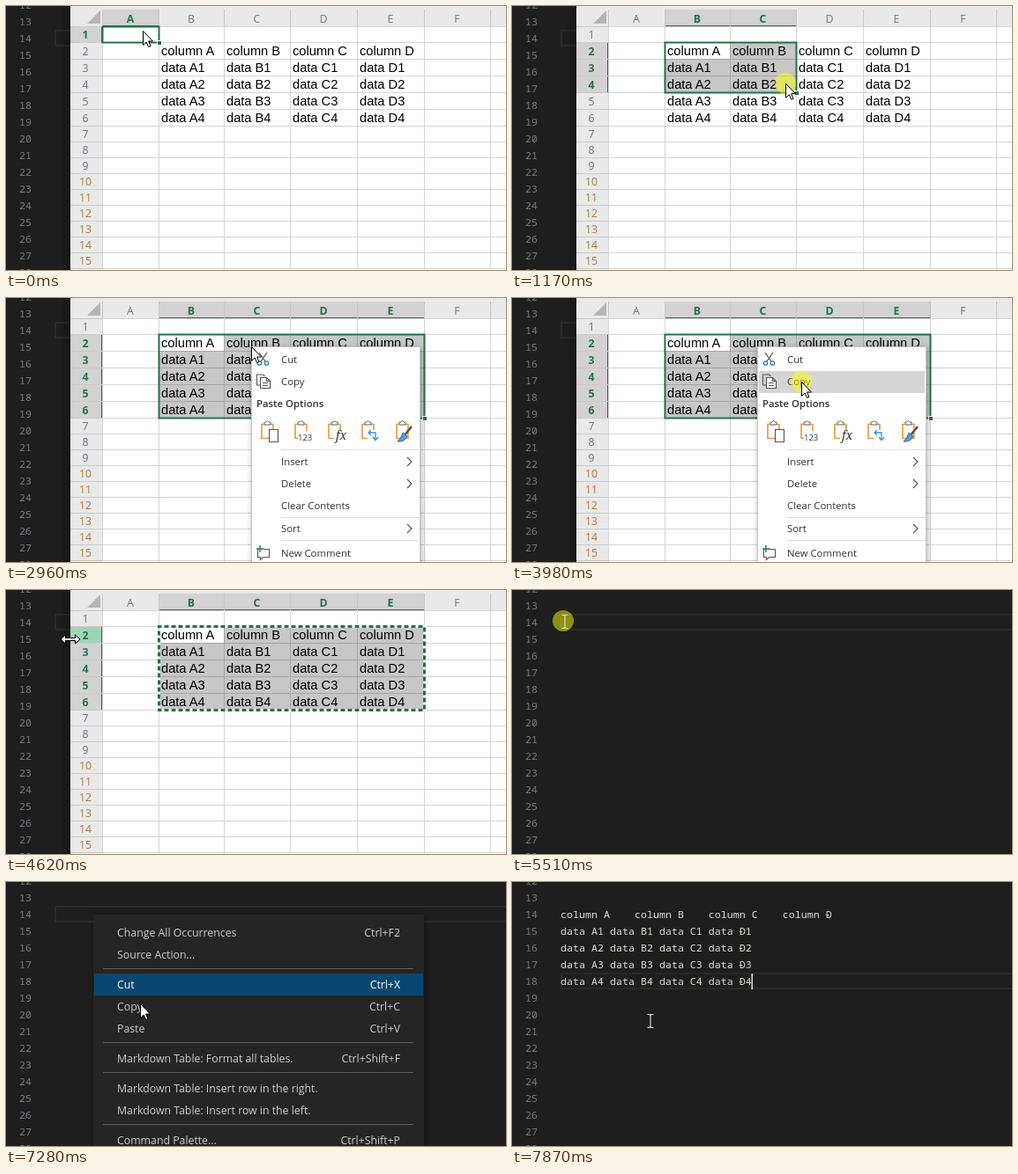
Write an HTML page that moves like this. It is 567 px wide and 300 px high and loops after 8000 ms.

```html
<!DOCTYPE html>
<html lang="en">
<head>
<meta charset="utf-8">
<title>Copy cells into the editor</title>
<style>
html, body { margin: 0; width: 100%; height: 100%; overflow: hidden; background: #1e1e1e; }
svg { display: block; width: 567px; height: 300px; }
text { white-space: pre; }
.mono { font: 11.667px "Noto Sans Mono", monospace; }
.cell { font: 14.67px "Liberation Sans", Arial, sans-serif; fill: #000; }
.head { font: 12.3px "Open Sans", sans-serif; text-anchor: middle; }
.sheetMenu { font: 11.35px "Open Sans", sans-serif; fill: #333; }
.editMenu { font: 12.3px "Open Sans", sans-serif; fill: #ccc; }
.menu { filter: drop-shadow(1px 2px 3px rgba(0, 0, 0, .35)); }
</style>
</head>
<body>
<script>
const LOOP = 8000;
const GREEN = '#217346';
const COLS = [109, 173, 247, 322, 398, 474, 549, 625];
const ROWS = [23, 41, 60, 79, 98, 117, 136];
while (ROWS.length < 17) ROWS.push(ROWS[ROWS.length - 1] + 18);

// Pointer track: time, x, y
const TRACK = [
  [0, 155, 28], [120, 155, 28], [380, 190, 57], [780, 190, 57], [1480, 405, 112],
  [1710, 441, 134], [1860, 441, 134], [1990, 439, 117], [2030, 437, 115], [2370, 278, 55],
  [3300, 278, 55], [3470, 312, 81], [3590, 312, 81], [3750, 328, 95], [4130, 328, 95],
  [4620, 73, 56], [4670, 73, 56], [4860, 58, 35], [5800, 58, 35], [6020, 100, 36],
  [6960, 100, 36], [7280, 152, 138], [7320, 152, 138], [7430, 155, 157], [8000, 155, 157]
];
const PRESSES = [[690, 1860], [2680, 2830], [3980, 4130], [5430, 5570], [6330, 6480], [7600, 7740]];
const T = { select: 690, sheetMenu: 2840, copied: 4130, toEditor: 5460, editMenu: 6500, menuGone: 7840, pasted: 7870 };

function el(tag, attrs, parent) {
  const node = document.createElementNS('http://www.w3.org/2000/svg', tag);
  set(node, attrs);
  if (parent) parent.appendChild(node);
  return node;
}
function set(node, attrs) {
  for (const key in attrs) node.setAttribute(key, attrs[key]);
}
function show(node, on) {
  node.style.display = on ? '' : 'none';
}
function group(parent, attrs = {}) {
  return el('g', attrs, parent);
}
function rect(parent, x, y, width, height, fill, more = {}) {
  return el('rect', { x, y, width, height, fill, ...more }, parent);
}
function path(parent, d, stroke, width = 1, fill = 'none') {
  return el('path', { d, stroke, 'stroke-width': width, fill }, parent);
}
function text(parent, x, y, str, cls, more = {}) {
  const node = el('text', { x, y, class: cls, ...more }, parent);
  node.textContent = str;
  return node;
}

const svg = el('svg', { viewBox: '0 0 567 300', width: 567, height: 300 }, document.body);

// Editor
const lineY = n => 37 + 19 * (n - 14);
rect(svg, 0, 0, 567, 300, '#1e1e1e');
const activeLine = rect(svg, 56, 28, 530, 17, 'none', { stroke: '#2a2a2a', 'stroke-width': 2 });
for (let n = 12; n <= 28; n++) text(svg, 15, lineY(n) + 4, n, 'mono', { fill: '#757b80' });
const pasted = group(svg, { fill: '#dcdcd6' });
const letters = ['A', 'B', 'C', 'Đ'];
text(pasted, 55, 41, letters.map(c => 'column ' + c).join('    '), 'mono');
for (let r = 1; r <= 4; r++) {
  text(pasted, 55, lineY(14 + r) + 4, letters.map(c => 'data ' + c + r).join(' '), 'mono');
}
rect(pasted, 271.5, 104, 1.5, 18, '#ddd');

// Spreadsheet
const sheet = group(svg);
const shade = el('linearGradient', { id: 'shade' }, el('defs', {}, svg));
el('stop', { offset: 0, 'stop-color': '#000', 'stop-opacity': 0 }, shade);
el('stop', { offset: 1, 'stop-color': '#000', 'stop-opacity': .25 }, shade);
rect(sheet, 60, 0, 13, 300, 'url(#shade)');
rect(sheet, 73, 0, 494, 300, '#fff');
rect(sheet, 73, 0, 494, 23, '#e9e9e9');
rect(sheet, 73, 23, 36, 277, '#e9e9e9');
path(sheet, 'M107 5V20H92Z', 'none', 0, '#b5b5b5');

function header(x, y, w, h, label, color, vertical) {
  const bg = rect(sheet, x, y, w, h, '#d2d2d2');
  const edge = vertical ? rect(sheet, x + w - 1, y, 2, h + 1, GREEN) : rect(sheet, x, y + h - 1, w + 1, 2, GREEN);
  const node = text(sheet, x + w / 2 - (vertical ? 1 : 0), y + h / 2 + 5, label, 'head');
  return (on, hover) => {
    show(bg, on || hover);
    show(edge, on);
    set(bg, { fill: hover ? '#9fd5b7' : '#d2d2d2' });
    set(node, { fill: on ? GREEN : color, 'font-weight': on ? 700 : 400 });
    node.style.fontWeight = on ? 700 : 400;
  };
}
const colHeads = [...'ABCDEF'].map((c, i) =>
  header(COLS[i], 4, COLS[i + 1] - COLS[i], 19, c, '#6f7d76', false));
const rowHeads = ROWS.slice(0, 15).map((y, i) =>
  header(73, y, 36, ROWS[i + 1] - y, i + 1, i < 9 ? '#6b7280' : '#ad7c3e', true));

for (const x of COLS) {
  rect(sheet, x, 4, 1, 19, '#c6c6c6');
  rect(sheet, x, 23, 1, 277, '#d4d4d4');
}
for (const y of ROWS) {
  rect(sheet, 73, y, 36, 1, '#cacaca');
  rect(sheet, 109, y, 458, 1, '#d4d4d4');
}
const tint = path(sheet, '', 'none', 0, '#000');
set(tint, { 'fill-opacity': .22, 'fill-rule': 'evenodd' });
for (let c = 1; c <= 4; c++) {
  for (let r = 1; r <= 5; r++) {
    const letter = 'ABCD'[c - 1];
    text(sheet, COLS[c] + 3, (ROWS[r] + ROWS[r + 1]) / 2 + 5.5,
      r === 1 ? 'column ' + letter : 'data ' + letter + (r - 1), 'cell');
  }
}
const border = rect(sheet, 0, 0, 0, 0, 'none', { stroke: GREEN, 'stroke-width': 2 });
const handle = rect(sheet, 0, 0, 5, 5, GREEN, { stroke: '#fff', 'stroke-width': 1 });
const ants = group(sheet);
const antBox = { x: 173.5, y: 41.5, width: 301, height: 95, fill: 'none' };
el('rect', { ...antBox, stroke: '#fff', 'stroke-width': 3 }, ants);
const antDash = el('rect', { ...antBox, stroke: GREEN, 'stroke-width': 3, 'stroke-dasharray': '5 3' }, ants);

// Spreadsheet context menu
const sheetMenu = group(svg, { class: 'menu' });
rect(sheetMenu, 278.5, 55.5, 191, 260, '#fff', { stroke: '#c6c6c6' });
const sheetHover = rect(sheetMenu, 280, 57, 188, 25, '#d5d5d5');
[['Cut', 70], ['Copy', 95], ['Insert', 186, 1], ['Delete', 211, 1], ['Clear Contents', 236],
 ['Sort', 262, 1], ['New Comment', 290]].forEach(([label, y, more]) => {
  text(sheetMenu, 312, y + 4, label, 'sheetMenu');
  if (more) path(sheetMenu, `M455 ${y - 5}l5 5l-5 5`, '#555', 1.2);
});
text(sheetMenu, 284, 124, 'Paste Options', 'sheetMenu').style.fontWeight = 600;
for (const y of [172, 249, 275]) rect(sheetMenu, 312, y, 156, 1, '#dcdcdc');

path(sheetMenu, 'M287 62l7 10M296 62l-7 10', '#555', 1.3);
for (const x of [287.5, 295.5]) el('circle', { cx: x, cy: 74, r: 2.2, fill: 'none', stroke: '#2b7bc0', 'stroke-width': 1.3 }, sheetMenu);
path(sheetMenu, 'M288 99h-3.500v-12h7l2 2', '#555', 1.1);
path(sheetMenu, 'M288.500 90.500h7l4 4v8h-11zM295.500 90.500v4h4M291 96.500h6M291 99.500h6', '#555', 1.1, '#fff');
path(sheetMenu, 'M285.500 285.500h13v9h-7l-3 3v-3h-3z', '#555', 1.1, '#fff');
path(sheetMenu, 'M288 281v8M284 285h8', '#2e8b57', 1.6);

for (const x of [289, 327, 365, 403, 442]) {
  path(sheetMenu, `M${x + 1} 143.500h13v16h-13z`, '#e39a3b', 1.6, '#fff');
  path(sheetMenu, `M${x + 4} 144v-3h2q1.500 -3 3 0h2v3z`, '#666', 1, '#fff');
}
path(sheetMenu, 'M298.500 149.500h10v14h-10z', '#555', 1.1, '#fff');
rect(sheetMenu, 331, 151, 18, 12, '#fff');
text(sheetMenu, 331, 162, '123', 'sheetMenu').style.fontSize = '9.5px';
rect(sheetMenu, 372, 150, 14, 13, '#fff');
const fx = text(sheetMenu, 374, 161, 'fx', 'sheetMenu');
fx.style.font = 'italic 14px "Noto Serif", serif';
rect(sheetMenu, 410, 150, 13, 14, '#fff');
path(sheetMenu, 'M412 153h7v8M416 158l3 3.500l3 -3.500M414 150l-3 3l3 3', '#3a8fd0', 1.3);
path(sheetMenu, 'M460 146l-8 10', '#555', 2.6);
path(sheetMenu, 'M450 153l5 4q-3 7 -11 6q4 -3 6 -10z', '#2b6ca8', 1, '#5b9bd5');

// Editor context menu
const editMenu = group(svg, { class: 'menu' });
rect(editMenu, 99, 37, 375, 290, '#252526');
const editHover = rect(editMenu, 100, 104, 373, 25, '#094771');
const EDIT_ITEMS = [
  ['Change All Occurrences', 57, 'Ctrl+F2'], ['Source Action...', 82], ['Cut', 116, 'Ctrl+X'],
  ['Copy', 141, 'Ctrl+C'], ['Paste', 166, 'Ctrl+V'],
  ['Markdown Table: Format all tables.', 200, 'Ctrl+Shift+F'],
  ['Markdown Table: Insert row in the right.', 234],
  ['Markdown Table: Insert row in the left.', 259], ['Command Palette...', 293, 'Ctrl+Shift+P']
].map(([label, y, keys]) => {
  const item = group(editMenu);
  text(item, 126, y + 4.5, label, 'editMenu');
  if (keys) text(item, 447, y + 4.5, keys, 'editMenu', { 'text-anchor': 'end' });
  return { y, item };
});
for (const y of [98, 182, 216, 275]) rect(editMenu, 110, y, 352, 1, '#606061');

// Pointer
const press = el('circle', { r: 12, fill: '#ff0', 'fill-opacity': .5 }, svg);
const pointer = group(svg);
const cursors = {
  arrow: path(pointer, 'M.5 .5V16.500L4.200 13L6.600 18.500L9 17.500L6.600 12H11.500Z', '#000', 1, '#fff'),
  resize: path(pointer, 'M-11 0l5.500 -5v3.500h11v-3.500l5.500 5l-5.500 5v-3.500h-11v3.500z', '#000', 1, '#fff'),
  beam: path(pointer, 'M-1.500 -6.500h2.500l1 1l1 -1h2.500M-1.500 8.500h2.500l1 -1l1 1h2.500M2 -5.500v13', '#ddd', 1.2)
};

function pointerAt(t) {
  let i = 1;
  while (i < TRACK.length - 1 && TRACK[i][0] < t) i++;
  const [t0, x0, y0] = TRACK[i - 1], [t1, x1, y1] = TRACK[i];
  const k = Math.max(0, Math.min(1, (t - t0) / (t1 - t0)));
  return [x0 + (x1 - x0) * k, y0 + (y1 - y0) * k];
}

// Selected cells as [first column, first row, last column, last row]
function selection(t) {
  if (t < T.select) return [0, 0, 0, 0];
  const [x, y] = pointerAt(Math.max(T.select, Math.min(t, 1860) - 50));
  const cell = (edges, v, max) => Math.min(max, edges.filter(e => e <= v).length - 1);
  return [1, 1, cell(COLS, x, 4), cell(ROWS, y, 5)];
}

function drawSheet(t, x, y) {
  const [c0, r0, c1, r1] = selection(t);
  const left = COLS[c0], top = ROWS[r0], right = COLS[c1 + 1], bottom = ROWS[r1 + 1];
  const copied = t >= T.copied;
  const overRows = x >= 70 && x < 109;
  colHeads.forEach((draw, i) => draw(i >= c0 && i <= c1, false));
  rowHeads.forEach((draw, i) => draw(i >= r0 && i <= r1, overRows && y >= ROWS[i] && y < ROWS[i + 1]));
  const box = (r, b) => `M${left + 1} ${top + 1}H${r}V${b}H${left + 1}Z`;
  set(tint, { d: box(right, bottom) + box(COLS[c0 + 1], ROWS[r0 + 1]) });
  set(border, { x: left + .5, y: top + .5, width: right - left, height: bottom - top });
  set(handle, { x: right - 1.5, y: bottom - 1.5 });
  show(border, !copied);
  show(handle, !copied);
  show(ants, copied);
  set(antDash, { 'stroke-dashoffset': -Math.floor(t / 45) % 8 });
}

function draw(t) {
  const [x, y] = pointerAt(t);
  const inSheet = t < T.toEditor;
  show(sheet, inSheet);
  if (inSheet) drawSheet(t, x, y);

  show(sheetMenu, t >= T.sheetMenu && t < T.copied);
  set(sheetMenu, { opacity: Math.min(1, Math.max(0, (t - T.sheetMenu + 30) / 140)) });
  show(sheetHover, y >= 57);
  set(sheetHover, { y: y < 83 ? 57 : 83 });

  const done = t >= T.pasted;
  show(pasted, done);
  set(activeLine, { y: done ? 104 : 28 });

  const menuOpen = t >= T.editMenu && t < T.menuGone;
  show(editMenu, menuOpen);
  const hoverY = pointerAt(t - 80)[1];
  const hovered = EDIT_ITEMS.find(o => hoverY >= o.y - 12 && hoverY < o.y + 13);
  show(editHover, hovered);
  if (hovered) set(editHover, { y: hovered.y - 12.5 + .5 });
  for (const o of EDIT_ITEMS) {
    for (const node of o.item.children) node.style.fill = o === hovered ? '#fff' : '#ccc';
  }

  show(press, PRESSES.some(([a, b]) => t >= a && t < b));
  set(press, { cx: x, cy: y });
  let kind = menuOpen ? 'arrow' : 'beam';
  if (inSheet) kind = x < 66 ? 'beam' : x < 76 ? 'resize' : 'arrow';
  for (const name in cursors) show(cursors[name], name === kind);
  set(pointer, { transform: `translate(${x} ${y})` });
}

const start = performance.now();
function tick() {
  draw((performance.now() - start) % LOOP);
  requestAnimationFrame(tick);
}
tick();
</script>
</body>
</html>
```
